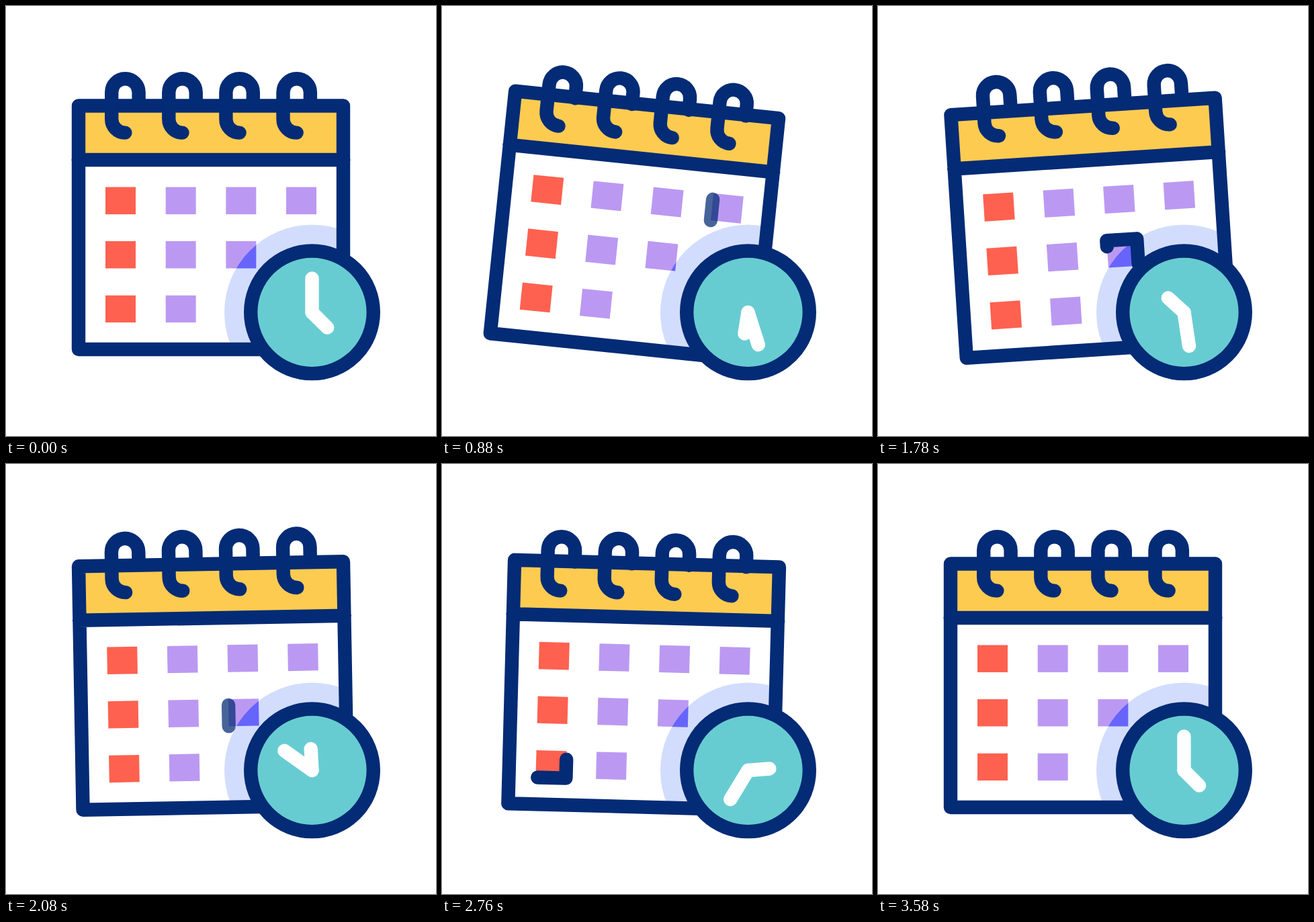
These frames come from a looping animation (640x640 px, 3620 ms). An HTML page:

```html
<!DOCTYPE html>
<html lang="en">
<head>
<meta charset="utf-8">
<title>Calendar and clock</title>
<style>
  html, body { margin: 0; width: 100%; height: 100%; overflow: hidden; background: #fff; }
  svg { display: block; width: 100vw; height: 100vh; }
  .line { fill: none; stroke: #042b75; stroke-width: 20.4; stroke-linecap: round; stroke-linejoin: round; }
</style>
</head>
<body>
<svg viewBox="0 0 640 640">
  <defs>
    <clipPath id="body"><rect x="108" y="148.5" width="394" height="362.5"/></clipPath>
    <clipPath id="disc"><circle cx="455.5" cy="456" r="130.5"/></clipPath>
  </defs>
  <g class="swing">
    <rect x="108" y="148.5" width="394" height="362.5" fill="#fff"/>
    <rect x="108" y="148.5" width="394" height="80.5" fill="#fdcb50"/>
    <g id="days"></g>
    <g clip-path="url(#body)">
      <g class="still">
        <g clip-path="url(#disc)">
          <g class="swing" id="shade"></g>
        </g>
      </g>
    </g>
    <path class="line" d="M108 148.5H502V511H108ZM107.6 229H502.4"/>
    <g id="rings"></g>
    <g id="traces"></g>
  </g>
  <circle class="line" cx="455.5" cy="455.8" r="91.3" style="fill:#67ccd1"/>
  <g class="line" style="stroke:#fff">
    <path id="long" d="M455.5 456v-50.5"/>
    <path id="short" d="M455.5 456v-32"/>
  </g>
</svg>
<script>
const LOOP = 3620, TURN = 3600, SWING = 2500 / 3;
const W = 45, H = 40.4, PERIMETER = 2 * (W + H);
const $ = id => document.getElementById(id);
const all = sel => [...document.querySelectorAll(sel)];

function add(parent, tag, attrs) {
  const el = document.createElementNS('http://www.w3.org/2000/svg', tag);
  for (const key in attrs) el.setAttribute(key, attrs[key]);
  return parent.appendChild(el);
}

const clamp = x => Math.min(1, Math.max(0, x));
const ease = x => (x = clamp(x), x * x * (3 - 2 * x));

// Eased value through equally spaced keys
function through(keys, t) {
  const pos = Math.min(keys.length - 1, Math.max(0, t / SWING));
  const i = Math.min(keys.length - 2, Math.floor(pos));
  return keys[i] + (keys[i + 1] - keys[i]) * ease(pos - i);
}

const dayX = col => 148 + 89.67 * col;
const dayY = row => 269.5 + 80.6 * row;

[4, 3, 2].forEach((count, row) => {
  for (let col = 0; col < count; col++) {
    const box = { x: dayX(col), y: dayY(row), width: W, height: H };
    add($('days'), 'rect', { ...box, fill: col ? '#bb99f2' : '#ff6150' });
  }
});
add($('shade'), 'rect', { x: 300, y: 300, width: 260, height: 300, fill: '#d2ddfd' });
add($('shade'), 'rect', { x: dayX(2), y: dayY(1), width: W, height: H, fill: '#6764fc' });

const rings = [0, 1, 2, 3].map(i => add($('rings'), 'path', {
  class: 'line',
  d: `M${197.6 + 85.1 * i} 145V128.4a20.2 20.2 0 0 0-40.4 0V168.4a20.2 20.2 0 0 0 20.2 20.2`
}));

const traces = [[3, 0], [2, 1], [0, 2]].map(([col, row]) => add($('traces'), 'path', {
  class: 'line',
  d: `M${dayX(col)} ${dayY(row) + H}h${W}v${-H}h${-W}v${H}`
}));

function drawTrace(el, t) {
  const alpha = Math.min(clamp(t / 300), clamp((1100 - t) / 300));
  el.style.display = alpha > 0 ? '' : 'none';
  const tail = PERIMETER * ease((t - 300) / 800);
  const head = PERIMETER * ease(t / 800);
  el.setAttribute('opacity', alpha);
  el.setAttribute('stroke-dasharray', `${Math.max(0.01, head - tail)} 999`);
  el.setAttribute('stroke-dashoffset', -tail);
}

const rotate = (el, deg, x, y) => el.setAttribute('transform', `rotate(${deg} ${x} ${y})`);
const swinging = all('.swing'), still = all('.still');

function draw(t) {
  const tilt = through([0, 6, -4, 2, 0], t);
  swinging.forEach(el => rotate(el, tilt, 320, 148.5));
  still.forEach(el => rotate(el, -tilt, 320, 148.5));
  rings.forEach((el, i) =>
    el.setAttribute('transform', `translate(0 ${through([0, 5, -5, 5, 0], t - 50 * i)})`));
  traces.forEach((el, i) => drawTrace(el, t - 1200 * i));
  const turn = 360 * ease(t / TURN);
  rotate($('long'), 3 * turn, 455.5, 456);
  rotate($('short'), 135 + turn, 455.5, 456);
}

const start = performance.now();
function tick() {
  draw((performance.now() - start) % LOOP);
  requestAnimationFrame(tick);
}
draw(0);
requestAnimationFrame(tick);
</script>
</body>
</html>
```
